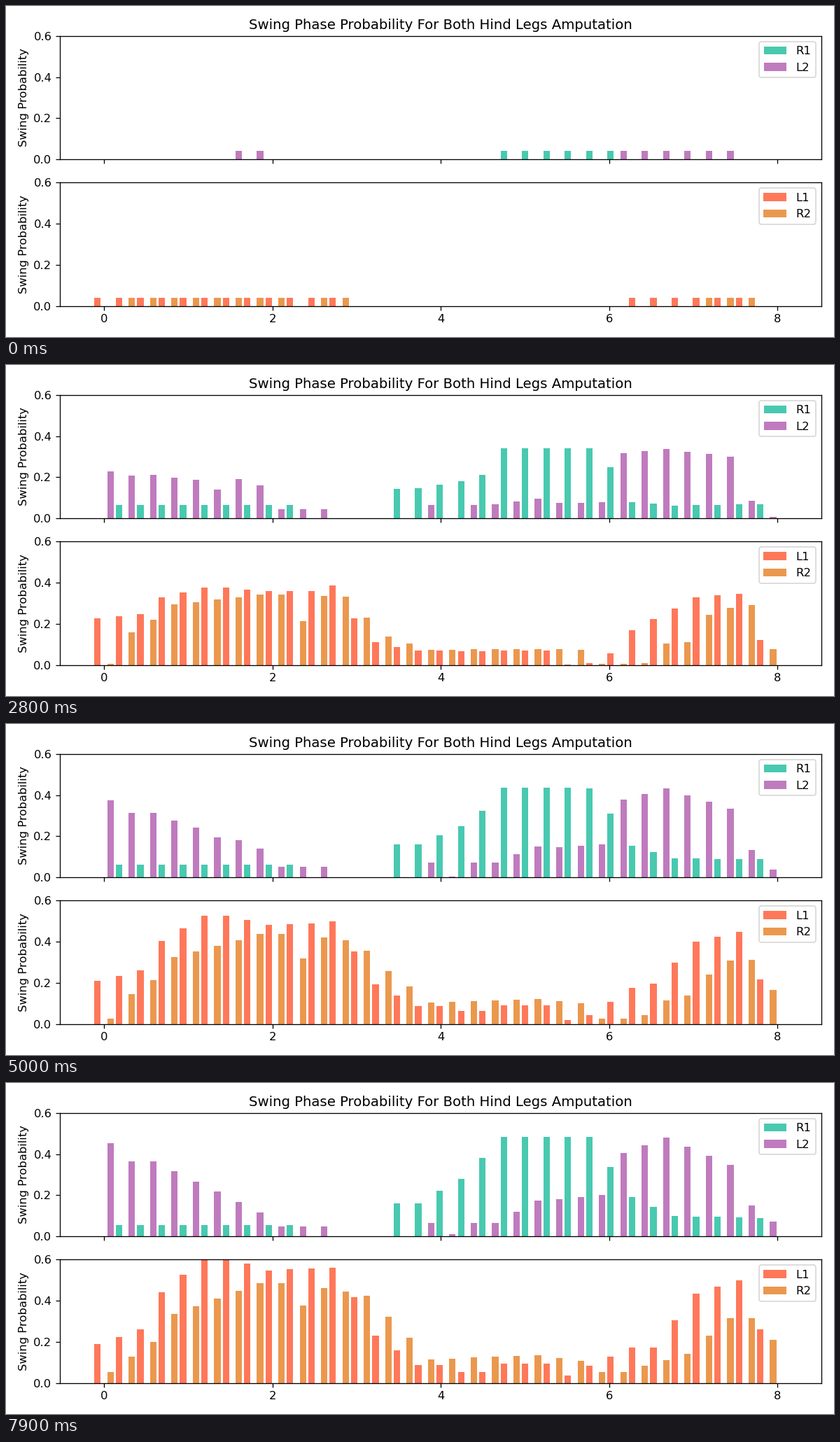
Write a matplotlib script that moves like this. It is 1183x473 px and loops after 8 s.

```python
import numpy as np
import matplotlib.pyplot as plt
from matplotlib.animation import FuncAnimation

DPI = 118.3
FRAMES, INTERVAL = 80, 100
SLOTS = 32
STEP = 8 / 63
WIDTH = 0.6 * STEP
SECOND, EARLY, LAST = 8, 21, FRAMES - 1
FIRST_LEVEL = 0.14  # slots above this at EARLY swing from the start

COLORS = {"R1": "#48c9b0", "L2": "#bf7bbe", "L1": "#ff785a", "R2": "#eb984e"}

# Outline of each series (slot: probability) at EARLY and at LAST
OUTLINES = {
    "R1": ({0: 0, 1: .034, 9: .034, 10: 0, 13: 0, 14: .114, 18: .13,
            19: .273, 23: .273, 24: .2, 25: .018, 31: .034},
           {0: 0, 1: .054, 9: .054, 10: 0, 13: 0, 14: .162, 15: .162,
            17: .28, 19: .484, 23: .482, 25: .19, 27: .1, 31: .09}),
    "L2": ({0: .13, 4: .138, 5: .09, 6: .176, 7: .148, 8: .007, 10: .007,
            11: 0, 14: 0, 15: .034, 16: 0, 17: .034, 20: .046, 21: .012,
            23: .012, 24: .27, 29: .265, 30: .04, 31: 0},
           {0: .452, 1: .365, 2: .365, 7: .118, 8: .048, 10: .048, 11: 0,
            14: 0, 15: .067, 16: .012, 17: .067, 18: .067, 20: .174,
            23: .2, 24: .404, 26: .48, 29: .346, 30: .151, 31: .074}),
    "L1": ({0: .22, 2: .223, 3: .273, 10: .273, 11: .307, 12: .138,
            13: .046, 15: .034, 21: .034, 22: 0, 23: 0, 24: .006, 25: .147,
            26: .22, 28: .273, 30: .273, 31: .05},
           {0: .19, 2: .259, 3: .44, 5: .61, 6: .61, 8: .547, 11: .56,
            12: .417, 13: .231, 15: .089, 16: .089, 17: .054, 18: .054,
            19: .093, 21: .093, 22: .038, 25: .172, 26: .172, 28: .435,
            30: .499, 31: .262}),
    "R2": ({0: 0, 1: .145, 3: .262, 8: .273, 9: .134, 10: .273, 11: .273,
            12: .138, 13: .05, 15: .034, 22: .034, 23: 0, 25: 0, 26: .077,
            27: .077, 28: .23, 30: .262, 31: .006},
           {0: .054, 2: .2, 3: .334, 7: .486, 8: .486, 9: .375, 10: .462,
            12: .425, 15: .115, 20: .136, 22: .107, 23: .054, 24: .054,
            27: .142, 29: .316, 30: .316, 31: .21}),
}


def samples(n):
    """Number of observations gathered up to frame n."""
    return np.interp(n, [0, 11, 36, LAST], [24.5, 60, 128, 235])


def spread(outline):
    return np.interp(range(SLOTS), list(outline), list(outline.values()))


def swings(early, last, n):
    """Swings counted in every slot up to frame n."""
    a, b = early * samples(EARLY), last * samples(LAST)
    if n <= EARLY:
        t = max(0, (n - SECOND) / (EARLY - SECOND))
        first = min(n, SECOND) + 1
        opening = first + (a - first) * t
        joining = np.clip(a - (EARLY - n), 0, a * t)
        return np.where(early > FIRST_LEVEL, opening, joining)
    # slots that gain little level off sooner, empty ones start slowly
    gain = b - a
    power = np.where(a > 0, 1 - 6 / np.maximum(gain, 10), 1.5)
    return a + gain * ((n - EARLY) / (LAST - EARLY)) ** power


fig, axes = plt.subplots(2, 1, sharex=True, dpi=DPI,
                         figsize=(1183 / DPI, 473 / DPI))
x = 2 * STEP * np.arange(SLOTS)
bars = {}
for ax, pair in zip(axes, (("R1", "L2"), ("L1", "R2"))):
    for name, side in zip(pair, (-1, 1)):
        bars[name] = ax.bar(x + side * WIDTH, np.zeros(SLOTS), WIDTH,
                            color=COLORS[name], label=name)
    ax.set_xlim(-0.525, 8.525)
    ax.set_ylim(0, 0.6)
    ax.set_xticks([0, 2, 4, 6, 8])
    ax.set_yticks([0, 0.2, 0.4, 0.6])
    ax.set_ylabel("Swing Probability")
    ax.legend(loc="upper right")
axes[0].set_title("Swing Phase Probability For Both Hind Legs Amputation")
fig.tight_layout()

profiles = {name: [spread(o) for o in pair] for name, pair in OUTLINES.items()}


def update(n):
    for name, group in bars.items():
        for bar, count in zip(group, swings(*profiles[name], n)):
            bar.set_height(count / samples(n))
    return [bar for group in bars.values() for bar in group]


anim = FuncAnimation(fig, update, frames=FRAMES, interval=INTERVAL,
                     repeat=True, repeat_delay=0)
plt.show()
```
